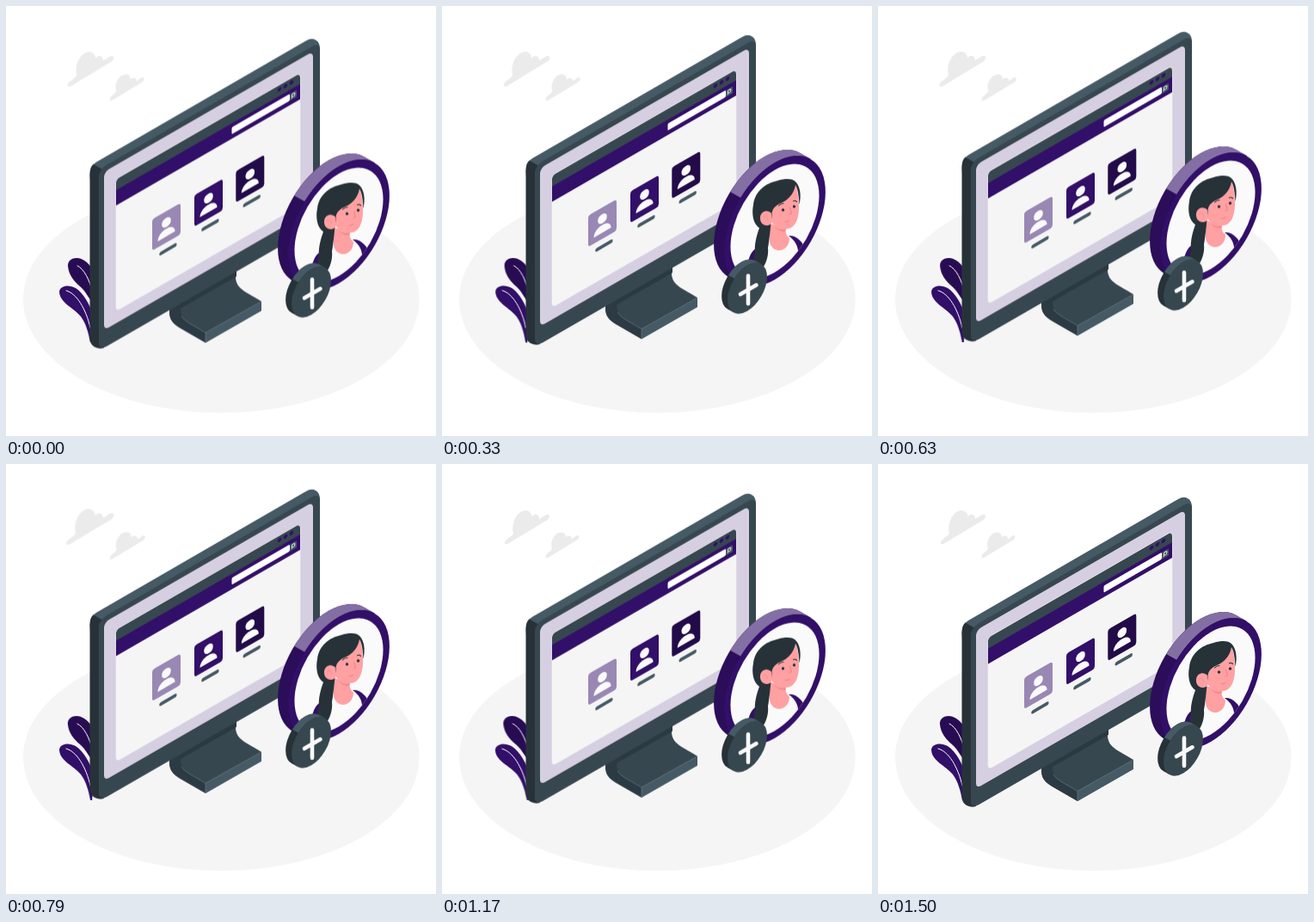
These frames come from a looping animation (500 px wide and 500 px high, 1540 ms). An HTML page:

```html
<!DOCTYPE html>
<html lang="en">
<head>
<meta charset="utf-8">
<title>Add profile</title>
<style>
  html, body { margin: 0; width: 100%; height: 100%; overflow: hidden; background: #fff; }
  svg { display: block; width: 100%; height: 100%; }
  #clouds { transform-origin: 116px 82px; }
  #plant { transform-origin: 82px 342px; }
</style>
</head>
<body>
<svg viewBox="0 0 500 500">
  <defs>
    <clipPath id="face"><circle r="59.5" transform="matrix(.866 -.5 0 1 387 255)"/></clipPath>
    <clipPath id="screen"><rect width="214" height="153.5" rx="5"/></clipPath>
    <g id="user">
      <rect width="33" height="36.5" rx="3"/>
      <g fill="#fafafa">
        <circle cx="16.5" cy="13" r="5.3"/>
        <path d="M6.5 29.3C6.5 17.4 26.5 17.4 26.5 29.3Z"/>
      </g>
      <path d="M10.3 45.4H26.5" stroke="#455a64" stroke-width="4.2" stroke-linecap="round"/>
    </g>
  </defs>

  <ellipse cx="250.3" cy="341" rx="230.3" ry="132" fill="#f5f5f5"/>

  <g id="clouds" fill="#ebebeb">
    <path d="M73 91C74 87 82 84 83 80.500C80 68 88 54 97 54C102 54 104.500 58 104.500 61.500C108 56 113 59 113 64L120.500 59.300C125.500 56.500 126.500 62 122.500 65L77 92.500C74 94 72.500 93.500 73 91Z"/>
    <path d="M120.500 107C122 103 127 101.500 128 98.500C125 90 131 80 138 79.500C142 79 144 82 144 85.500C147 82 151 83.500 151 87.300L156 83.500C159.500 81.500 160.500 86 157.500 88L124 108.500C121.500 110 120 109 120.500 107Z"/>
  </g>

  <g id="plant">
    <path d="M72 303C71 295 79 291.500 86 293.500C94 296 99 303 104 312L106 352C97 342 94 333 86 326C79 320 73 313 72 303Z" fill="#280c53"/>
    <path d="M62 332C63 325 73 323.500 81 328C90 334 98 347 102 362L100 391H98C96 380 93 369 87 361C79 351 62 345 62 332Z" fill="#320f68"/>
    <g fill="none" stroke="#fff" stroke-width="1" stroke-linecap="round">
      <path d="M83 302C91 306 97 318 101 334"/>
      <path d="M70 331C82 334 93 352 98 374"/>
    </g>
  </g>

  <g id="device">
    <!-- stand -->
    <path d="M190 346L271 300V304C266 309 265 321 272 328C277 333 286 337 297 344V354.800L232 392L203 375.200C194 370 190 365 190 356Z" fill="#37474f"/>
    <path d="M190 350L203 344V352C203 360 206 365 213 369.300L232 380.300V392L203 375.200C194 370 190 365 190 356Z" fill="#2c3b43"/>
    <path d="M232 380.300L297 344V354.800L232 392Z" fill="#455a64"/>
    <path d="M203 340L268 303V315L203 352Z" fill="#2b3940"/>
    <path d="M204 361Q206 365 213 369.300L232 380.300V391.500M232 380.300L297 344" fill="none" stroke="#71818a" stroke-width=".6"/>

    <!-- monitor -->
    <path d="M97.500 196.500Q97.500 186.500 105 182L347 42Q355 36.500 360 40Q365 42.500 365 50.500L340 110L110 390Z" fill="#455a64"/>
    <path d="M97.500 196.500Q97.500 187.500 101.500 184.500L112 190.500Q108 194.500 108 200.500L114 398Q109 400 103 397Q97.500 394 97.500 386.500Z" fill="#263238"/>
    <rect width="257" height="211" rx="9" transform="matrix(1 -.577 0 1 108 190.500)" fill="#37474f"/>
    <rect width="243" height="184" rx="6" transform="matrix(1 -.577 0 1 114 193.500)" fill="#d6cfe1"/>
    <g transform="matrix(1 -.577 0 1 128 202)">
      <rect width="214" height="153" rx="5" fill="none" stroke="#e2dee8" stroke-width="1.500"/>
      <g clip-path="url(#screen)">
        <rect width="214" height="154" fill="#f5f5f5"/>
        <rect width="214" height="13" fill="#37474f"/>
        <rect y="12.500" width="214" height="18" fill="#320f68"/>
      </g>
      <g fill="#320f68">
        <circle cx="190" cy="5.200" r="2.300"/>
        <circle cx="197" cy="5.200" r="2.300"/>
        <circle cx="204" cy="5.200" r="2.300"/>
      </g>
      <rect x="134.500" y="17.300" width="67.500" height="8" rx="1.500" fill="#fff"/>
      <rect x="202" y="17.300" width="8" height="8" rx="1" fill="#455a64"/>
      <g fill="none" stroke="#fff" stroke-width=".8">
        <circle cx="206.200" cy="20.800" r="1.800"/>
        <path d="M205 22.200L203.800 23.600"/>
      </g>
    </g>
    <use href="#user" transform="matrix(1 -.577 0 1 170 248.600)" fill="#9987b4"/>
    <use href="#user" transform="matrix(1 -.577 0 1 219 220.500)" fill="#320f68"/>
    <use href="#user" transform="matrix(1 -.577 0 1 267.300 192.500)" fill="#230b49"/>

    <!-- profile disc -->
    <g transform="matrix(.866 -.5 0 1 387 255)">
      <g fill="#2b0d59">
        <circle cx="-13.900" cy="-13.900" r="68"/>
        <path d="M34.200 -62L48.100 -48.100L-48.100 48.100L-62 34.200Z"/>
      </g>
      <path d="M-45.900 -50.100L-59.800 -64A68 68 0 0 1 34.200 -62L48.100 -48.100A68 68 0 0 0 -45.900 -50.100Z" fill="#846fa4"/>
      <circle r="68" fill="#320f68"/>
      <circle r="59.500" fill="#fafafa"/>
    </g>
    <g clip-path="url(#face)">
      <path d="M403 272C412 271 420 279 424 290L414 294C415 284 410 277 403 272Z" fill="#320f68"/>
      <path d="M366 286C359 290 356 298 355 310H366Z" fill="#320f68"/>
      <path d="M380 258L400 262C399 268 400 271 404 275C404 284 397 290 391 289C385 288 382 284 381 279Z" fill="#ffa0a2"/>
      <path d="M386 261C391 265 395 265.500 400 264L399 267C394 267.500 389 265 386 261Z" fill="#f28a8c"/>
      <path d="M380 240C384 222 396 212 410 211C413 215 415 228 415 238C415 252 411 263 401 264C391 264 382 258 380 250Z" fill="#ffa0a2"/>
      <path d="M411 213C409 224 402 231 393 234.500C386 238 383.500 242 383.500 248L382 262C381 272 380 280 379 286C380 295 377 304 372 311C364 309 360 302 364 291C363 282 366 271 369 263C361.500 258 360 246 362 236C364 220 376 211 390 208C400 205 408 205.500 411.500 209.500C416.500 215 418 225 415.500 236C415 226 414 218 411 213Z" fill="#263238"/>
      <path d="M383 246C379 241 371 243 370 250C369 258 376 263 383 258Z" fill="#ffa0a2"/>
      <path d="M373 250Q377 247 379 254" fill="none" stroke="#f28a8c" stroke-width=".8"/>
      <g fill="#263238">
        <circle cx="396.500" cy="242" r="1.700"/>
        <circle cx="409.500" cy="238" r="1.700"/>
      </g>
      <g fill="none" stroke-linecap="round">
        <path d="M391.500 237Q393.500 234.500 397 234.500M408.500 231.700Q410.500 230.500 412.500 232.500" stroke="#263238" stroke-width="1.100"/>
        <path d="M404.500 239.500L406.500 246L404 247M399 255.500Q401.500 256.500 404 254.500" stroke="#e27c80" stroke-width=".8"/>
      </g>
    </g>

    <!-- plus badge -->
    <g transform="matrix(.866 -.5 0 1 355 333)">
      <g fill="#263238">
        <circle cx="-8" cy="-8" r="26.500"/>
        <path d="M10.700 -26.700L18.700 -18.700L-18.700 18.700L-26.700 10.700Z"/>
      </g>
      <path d="M-17.400 -20L-25.400 -28A26.500 26.500 0 0 1 10.700 -26.700L18.700 -18.700A26.500 26.500 0 0 0 -17.400 -20Z" fill="#455a64"/>
      <circle r="26.500" fill="#37474f"/>
    </g>
    <path d="M356 318.500V351M347 340L365.500 329.300" stroke="#fafafa" stroke-width="4.600" stroke-linecap="round"/>
  </g>
</svg>
<script>
  const start = document.timeline.currentTime || 0;
  const timing = { duration: 1540, delay: start - 40, iterations: Infinity, easing: 'linear' };

  // Each step is [offset, value].
  function loop(id, fn, unit, steps) {
    const frames = steps.map(([offset, v]) => ({ offset, transform: `${fn}(${v}${unit})` }));
    document.getElementById(id).animate(frames, timing).startTime = 0;
  }

  loop('device', 'translateY', 'px', [[0, 0], [.5, -10], [1, 0]]);
  loop('plant', 'rotate', 'deg', [[0, 0], [.25, 1], [.75, -1], [1, 0]]);
  loop('clouds', 'scale', '', [[0, 1], [.1, 1.1], [.3, 1], [.4, 1], [.5, 1.1], [.6, 1], [1, 1]]);
</script>
</body>
</html>
```
